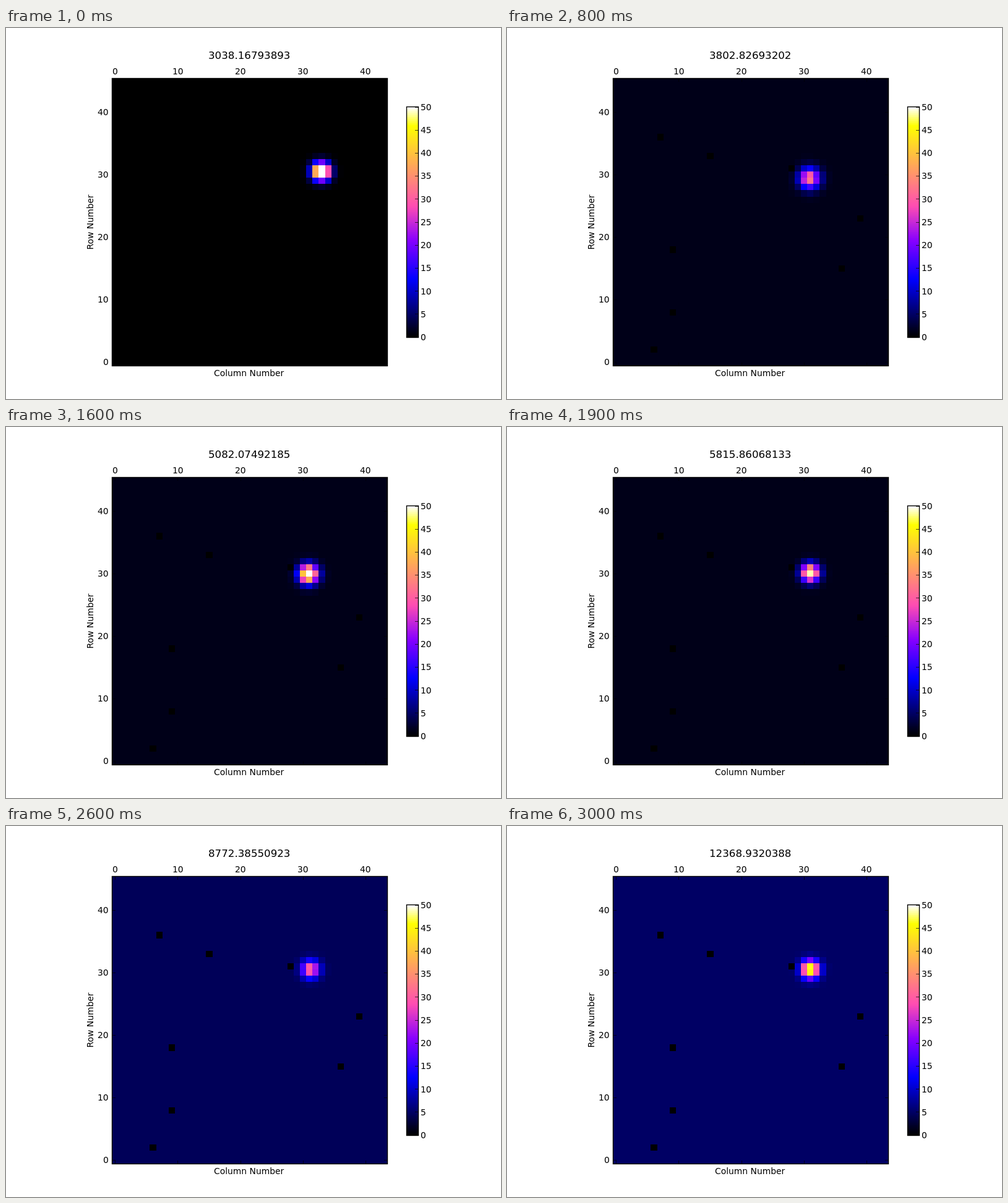
An HTML page with a canvas that plays this animation: 800 by 600 pixels, repeating every 3100 ms.

```html
<!DOCTYPE html>
<html lang="en">
<head>
<meta charset="utf-8">
<title>Spot by wavelength</title>
<style>
  html, body { margin: 0; width: 100%; height: 100%; overflow: hidden; background: #fff; }
  canvas, svg { position: absolute; left: 0; top: 0; }
  text { font: 13.89px "DejaVu Sans", sans-serif; fill: #000; }
  #title { font-size: 16.67px; }
  .mid { text-anchor: middle; }
  path, rect { fill: none; stroke: #000; stroke-width: 1.39; }
  .tick { stroke-width: .7; }
</style>
</head>
<body>
<canvas id="map" width="800" height="600"></canvas>
<svg id="axes" width="800" height="600" viewBox="0 0 800 600">
  <text id="title" x="327" y="50"></text>
  <text x="336" y="563">Column Number</text>
  <text class="mid" transform="translate(141 314) rotate(-90)">Row Number</text>
  <rect x="171.5" y="81.5" width="445" height="465"/>
  <rect x="647.5" y="127.5" width="19" height="373"/>
</svg>
<script>
const CELL = 10.109, LEFT = 171.83, BOTTOM = 545.5, DIGIT = 8.84;
const STEPS = 31, STEP_MS = 100, VMAX = 50;
const DEAD = [[6, 2], [9, 8], [9, 18], [7, 36], [15, 33], [28, 31], [39, 23], [36, 15]];

const { exp, sin, cos, min, max, round, floor, PI } = Math;
const ctx = document.getElementById('map').getContext('2d');
const svg = document.getElementById('axes');
const title = document.getElementById('title');
const colX = c => round(LEFT + c * CELL);
const rowY = r => round(BOTTOM - r * CELL);

// "gnuplot2" colour map with 256 levels
function colour(v) {
  const x = max(0, min(255, floor(v / VMAX * 256))) / 255;
  const blue = x < 0.25 ? 4 * x : x < 0.92 ? 1.84 - 2 * x : x / 0.08 - 11.5;
  const rgb = [x / 0.32 - 0.78125, 2 * x - 0.84, blue];
  return `rgb(${rgb.map(c => round(255 * max(0, min(1, c))))})`;
}

function cell(c, r, v) {
  const x = colX(c), y = rowY(r + 1);
  ctx.fillStyle = colour(v);
  ctx.fillRect(x, y, colX(c + 1) - x, rowY(r) - y);
}

// The spot settles quickly from its first place, then drifts and pulses
function spot(k) {
  const settle = exp(-k / 2);
  return {
    col: 31 + 1.87 * settle - 0.21 * sin(2 * PI * (k / 30) ** 1.52),
    row: min(30.53, 28.8 + 0.07 * k) + 1.7 * settle,
    peak: 42 + 13 * cos(PI / 10 * (k - 15.5)) + 19.5 * settle + 6.4 * exp(k - 30),
    variance: 0.96 + 0.5 * exp(-(((k - 11) / 4) ** 2))
  };
}

// Rises to a low plateau, then to a brighter one near the end
function background(k) {
  return 1.25 * (1 - exp(-k)) + 3.65 / (1 + exp(1.5 * (24.9 - k)));
}

// Mid wavelength of bins evenly spaced in 1/wavelength, 3000 to 13000
function wavelength(k) {
  const edge = i => 1 / (1 / 3000 - i / STEPS * (1 / 3000 - 1 / 13000));
  return Number(((edge(k) + edge(k + 1)) / 2).toPrecision(12));
}

function draw(k) {
  const { col, row, peak, variance } = spot(k);
  const back = background(k);
  ctx.fillStyle = colour(back);
  ctx.fillRect(171, 81, 446, 466);
  for (let r = 24; r < 37; r++) {
    for (let c = 25; c < 40; c++) {
      const d = (c - col) ** 2 + (r - row) ** 2;
      cell(c, r, back + peak * exp(-d / 2 / variance));
    }
  }
  DEAD.forEach(([c, r]) => cell(c, r, 0));
  title.textContent = wavelength(k);
}

function add(tag, attrs, text = '') {
  const el = document.createElementNS('http://www.w3.org/2000/svg', tag);
  for (const name in attrs) el.setAttribute(name, attrs[name]);
  el.textContent = text;
  svg.append(el);
}
const tick = d => add('path', { class: 'tick', d });
const label = (x, y, n) => add('text', { x: floor(x), y: round(y) }, n);

function buildAxes() {
  for (let n = 0; n <= 40; n += 10) {
    const x = LEFT + (n + 0.5) * CELL, y = BOTTOM - (n + 0.5) * CELL;
    const tx = floor(x) + 0.5, ty = floor(y) + 0.5;
    const width = DIGIT * String(n).length;
    label(x - width / 2, 75, n);
    label(166 - width, y + 4.6, n);
    tick(`M${tx} 82v5M${tx} 546v-5M172 ${ty}h5M616 ${ty}h-5`);
  }
  for (let v = 0; v <= VMAX; v += 5) {
    const y = 500 - v * 7.44;
    label(670, y + 4.9, v);
    tick(`M666 ${floor(y) + 0.5}h-5`);
  }
  for (let y = 128; y < 500; y++) {
    ctx.fillStyle = colour((499.5 - y) / 372 * VMAX);
    ctx.fillRect(648, y, 18, 1);
  }
}

let shown = -1;
function frame() {
  const k = floor(performance.now() / STEP_MS) % STEPS;
  if (k !== shown) draw(shown = k);
  requestAnimationFrame(frame);
}

buildAxes();
frame();
</script>
</body>
</html>
```
